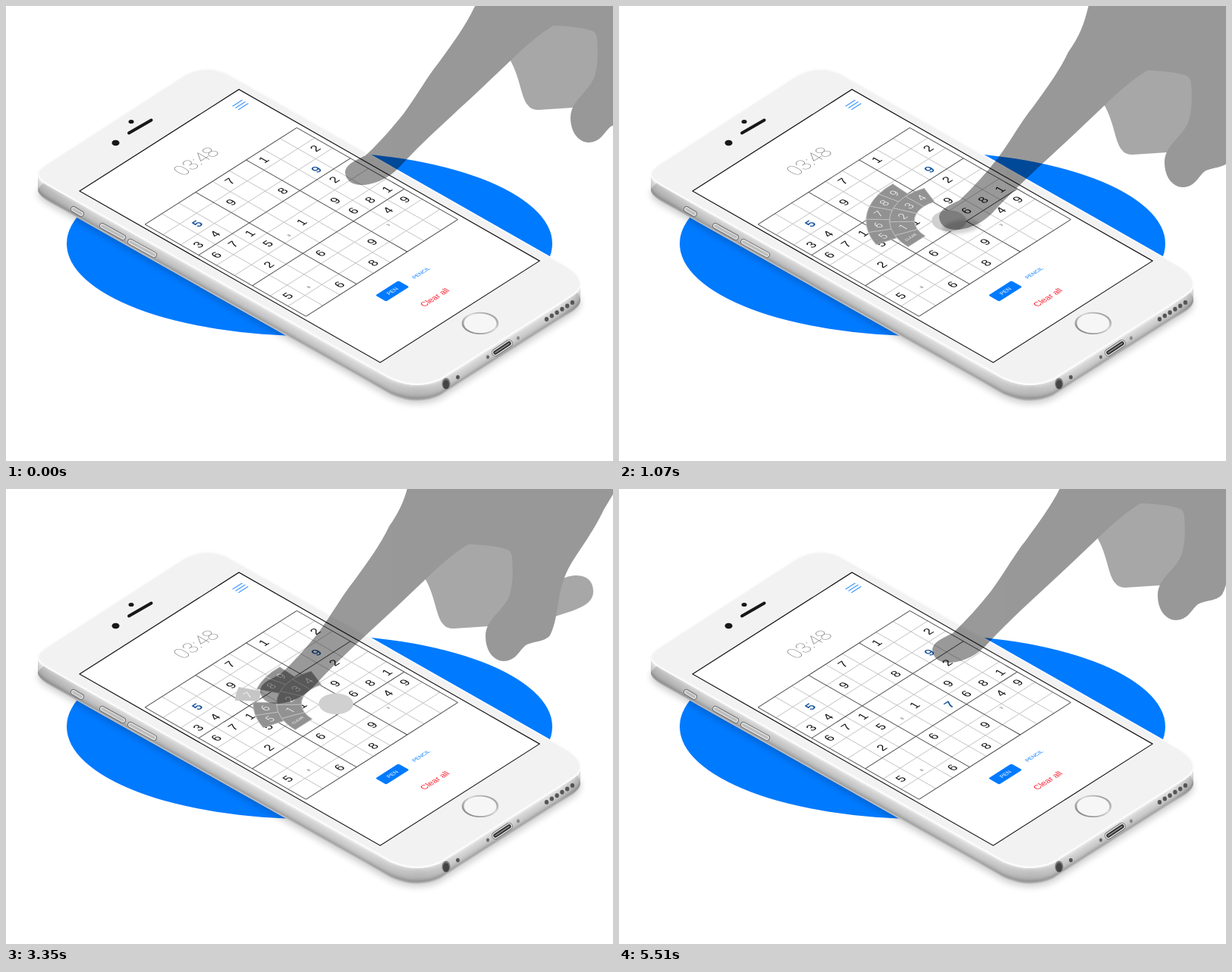
Animation, 800 px wide and 600 px high, one loop 6940 ms. Source, as an HTML page:

```html
<!DOCTYPE html>
<html lang="en">
<head>
<meta charset="utf-8">
<title>Sudoku radial input</title>
<style>
html, body { margin: 0; width: 100%; height: 100%; overflow: hidden; background: #fff; }
svg { display: block; width: 800px; height: 600px; }
text { font-family: "Liberation Sans", Arial, sans-serif; text-anchor: middle; }
.thin { font-family: Roboto, Inter, sans-serif; font-weight: 200; }
.light { font-family: Roboto, Inter, sans-serif; font-weight: 300; }
</style>
</head>
<body>
<svg viewBox="0 0 800 600" xmlns="http://www.w3.org/2000/svg">
  <defs>
    <path id="face" d="M59 205L234 92Q263 76 291 89L736 342Q757 354 757 367Q757 375 742 384L572 492Q541 506 506 490L58 237Q42 228 42 221Q43 215 59 205Z"/>
    <filter id="soft" x="-30%" y="-30%" width="160%" height="160%"><feGaussianBlur stdDeviation="5"/></filter>
    <filter id="blur" x="-50%" y="-100%" width="200%" height="300%"><feGaussianBlur stdDeviation="2"/></filter>
    <linearGradient id="shade" gradientUnits="userSpaceOnUse" x1="42" y1="0" x2="757" y2="0">
      <stop offset="0" stop-opacity=".14"/>
      <stop offset=".1" stop-opacity=".04"/>
      <stop offset=".6" stop-opacity="0"/>
      <stop offset=".7" stop-opacity=".1"/>
      <stop offset=".78" stop-opacity="0"/>
      <stop offset=".96" stop-opacity="0"/>
      <stop offset="1" stop-opacity=".14"/>
    </linearGradient>
    <linearGradient id="ring" x1="0" y1="0" x2="1" y2="0">
      <stop offset="0" stop-color="#8f8f8f"/>
      <stop offset=".6" stop-color="#d8d8d8"/>
      <stop offset="1" stop-color="#a4a4a4"/>
    </linearGradient>
  </defs>

  <ellipse cx="400" cy="313.500" rx="320" ry="121.500" fill="#007aff"/>
  <use href="#face" y="26" opacity=".2" filter="url(#soft)"/>
  <g id="side"></g>
  <use href="#face" y="22" fill="url(#shade)"/>

  <g id="buttons"></g>

  <use href="#face" y="1.500" fill="#fff"/>
  <use href="#face" fill="#f2f2f2" stroke="#fbfbfb" stroke-width="2"/>

  <g fill="#181818">
    <ellipse cx="144.500" cy="180.500" rx="5" ry="3.800"/>
    <ellipse cx="165" cy="152.500" rx="3.500" ry="2.600"/>
    <path d="M162 167.500L191.500 150.500" stroke="#181818" stroke-width="4" stroke-linecap="round"/>
  </g>

  <g id="ports"></g>

  <g transform="matrix(.56 -.3573 .594 .339 97 244)">
    <circle cx="187.500" cy="712" r="28" fill="#f6f6f6" stroke="url(#ring)" stroke-width="3.500"/>
    <rect width="375" height="667" fill="#fff" stroke="#111" stroke-width="1.900"/>
    <path d="M335 23.500h23m-23 6.500h23m-23 6.500h23" stroke="#1a84ff" stroke-width="1.700"/>
    <text class="thin" x="187.500" y="94.500" font-size="37" fill="#777">03:48</text>
    <g id="board"></g>
    <rect x="125.500" y="538" width="54" height="24" rx="3" fill="#007aff"/>
    <text x="152.500" y="554" font-size="11" fill="#fff">PEN</text>
    <text x="220" y="554" font-size="10.500" fill="#007aff">PENCIL</text>
    <text x="187.500" y="617" font-size="16.500" fill="#ff1f30">Clear all</text>
    <g id="wheel"></g>
  </g>

  <g id="hand">
    <ellipse id="contact" cx="476" cy="232" rx="25" ry="9" opacity="0" transform="rotate(-8 476 232)" filter="url(#blur)"/>
    <g opacity=".4">
      <path fill="#252525" d="M660 64C678 90 678 121 688 131Q692 137 702 137L748 134L790 110L785 30L720 20ZM840 74C862 61 886 66 886 88C886 106 865 112 836 121Z"/>
      <path d="M646 -70C640 -40 634 -22 617 2C606 26 588 50 570 75C556 92 543 116 524 142C508 162 492 180 474 197C460 204 447 209 447 220C448 231 458 237 472 236C490 234 505 226 517 214C552 176 590 143 625 110L665 72C684 53 702 38 721 26C735 26 760 28 773 33Q779 36 779 44C781 68 779 80 776 92C770 112 744 124 744 147C744 168 756 180 768 180C784 180 789 165 797 159C805 154 822 155 829 146C840 125 838 95 848 70C856 46 880 22 900 -20L930 -70Z"/>
    </g>
  </g>
</svg>
<script>
const $ = id => document.getElementById(id);
const clamp = x => Math.max(0, Math.min(1, x));
const label = (s, x, y, size, fill, extra = '') =>
  `<text x="${x}" y="${y + size * .36}" font-size="${size}" fill="${fill}" ${extra}>${s}</text>`;

// Metal side: the face repeated downwards, light near the glass, dark at the foot
const tones = [250, 236, 222, 214, 208, 204, 196, 182, 160, 205], depth = 22;
const toneAt = d => {
  const k = d / depth * (tones.length - 1), i = Math.min(Math.floor(k), tones.length - 2);
  return Math.round(tones[i] + (tones[i + 1] - tones[i]) * (k - i));
};
let side = '';
for (let d = depth; d > 0; d--) {
  const g = toneAt(d);
  side += `<use href="#face" y="${d}" fill="rgb(${g},${g},${g})"/>`;
}
$('side').innerHTML = side;

const pill = (x1, y1, x2, y2, layers) => layers.map(([color, width]) =>
  `<path d="M${x1} ${y1}L${x2} ${y2}" stroke="${color}" stroke-width="${width}" stroke-linecap="round"/>`).join('');
const keyLayers = [['#707070', 8], ['#e6e6e6', 6], ['#bdbdbd', 3.5]];
$('buttons').innerHTML =
  pill(89, 268, 99, 274, keyLayers) +
  pill(127, 290, 154, 305, keyLayers) +
  pill(164, 311, 195, 328, keyLayers);

const dot = (x, y, rx, ry, fill) => `<ellipse cx="${x}" cy="${y}" rx="${rx}" ry="${ry}" fill="${fill}"/>`;
let ports = pill(645, 457, 663, 445, [['#777', 10], ['#eee', 8], ['#333', 5.5], ['#999', 1.5]]);
for (let i = 0; i < 6; i++) ports += dot(712.5 + i * 6.8, 413 - i * 4.4, 2.7, 3, '#555');
ports += dot(635, 463, 2, 2.4, '#666') + dot(675, 438, 2, 2.4, '#888') +
  dot(595.5, 489.5, 2.4, 2.8, '#555') + dot(580, 498, 5.5, 7.5, '#777') + dot(580, 499, 4, 6, '#444');
$('ports').innerHTML = ports;

// Board
const cell = 39.7, left = 7.5, top0 = 138, span = cell * 9;
const rows = ['....7.1..', '.5.9....2', '34...8.9.', '671....2.', '..5.1.9..',
  '.2....681', '...6...49', '5....9...', '..6.8....'];
const entered = ['1,1', '2,7'];
const cx = c => left + (c + .5) * cell, cy = r => top0 + (r + .5) * cell;
const gridLine = (i, color, width) =>
  `<path d="M${left + i * cell} ${top0}v${span}M${left} ${top0 + i * cell}h${span}" stroke="${color}" stroke-width="${width}"/>`;
const penned = 'stroke="#0b4a96" stroke-width=".5"';
let board = '';
for (let i = 0; i <= 9; i++) if (i % 3) board += gridLine(i, '#c2c2c2', 1.3);
for (let i = 0; i <= 9; i += 3) board += gridLine(i, '#444', 1.5);
rows.forEach((row, r) => [...row].forEach((n, c) => {
  if (n === '.') return;
  const own = entered.includes(r + ',' + c);
  board += label(n, cx(c), cy(r), 23, own ? '#0b4a96' : '#111', own ? penned : '');
}));
board += label('8', cx(3), cy(4) + 10, 8, '#555') + label('3', cx(6) + 11, cy(7) - 12, 8, '#555') +
  label('8', cx(1), cy(7) + 9, 8, '#555');
board += label('7', cx(5), cy(5), 23, '#0b4a96', 'id="answer" ' + penned);
$('board').innerHTML = board;

// Radial keypad: two rings of five around the touched cell
const mid = 236;
const polar = (r, deg) => [r * Math.cos(deg * Math.PI / 180), r * Math.sin(deg * Math.PI / 180)];
const at = (r, deg) => polar(r, deg).map(v => v.toFixed(2)).join(' ');
const sector = (r1, r2, a, b) =>
  `M${at(r1, a)}L${at(r2, a)}A${r2} ${r2} 0 0 1 ${at(r2, b)}L${at(r1, b)}A${r1} ${r1} 0 0 0 ${at(r1, a)}Z`;
const ring = (keys, r1, r2, step) => keys.map((key, i) => {
  const a = mid + (i - 2.5) * step, [x, y] = polar((r1 + r2) / 2, a + step / 2);
  const word = key.length > 1;
  return `<g id="key${key}"><path d="${sector(r1, r2, a, a + step)}" fill="#929292" stroke="#c4c4c4" stroke-width="1"/>` +
    label(key, x, y, word ? 7.5 : 21, '#fff', word ? '' : 'class="light"') + '</g>';
}).join('');
$('wheel').innerHTML = '<circle r="28" fill="#d0d0d0"/>' +
  ring(['5', '6', '7', '8', '9'], 96, 134, 15.2) +
  ring(['CLEAR', '1', '2', '3', '4'], 56, 96, 22.4);
const seven = $('key7'), sevenShape = seven.querySelector('path');

// Hand moves: start, length, ease-out power, then from, control, to
const moves = [
  { start: 500, len: 510, pow: 1, pts: [[0, 0], [-13, 29], [-25, 59]] },
  { start: 2840, len: 510, pow: 2.7, pts: [[-25, 59], [-75, 69], [-112, 47]] },
  { start: 5060, len: 450, pow: 1.5, pts: [[-112, 47], [-88, -1], [-34, -7]] }
];
const loop = 6940, tick = 30;
// Progress through a span, advancing in ticks
const phase = (t, start, len) => clamp(Math.floor((t - start) / tick + 1e-6) * tick / len);
const bend = ([a, b, c], s) => [0, 1].map(i =>
  (1 - s) ** 2 * a[i] + 2 * s * (1 - s) * b[i] + s * s * c[i]);

function draw(t) {
  const m = moves.filter(v => t >= v.start).pop() || moves[0];
  const s = 1 - (1 - phase(t, m.start, m.len)) ** m.pow;
  const [x, y] = bend(m.pts, s);
  $('hand').setAttribute('transform', `translate(${x.toFixed(2)} ${y.toFixed(2)})`);

  const open = phase(t, 890, 180), shut = phase(t, 5060, 180);
  const size = open * (1 - shut);
  $('wheel').setAttribute('transform', `translate(227 355) scale(${size || .001})`);
  $('wheel').setAttribute('opacity', size);

  const pull = phase(t, 3140, 210);
  const [px, py] = polar(29 * pull, mid);
  seven.setAttribute('transform', `translate(${px.toFixed(2)} ${py.toFixed(2)})`);
  const g = Math.round(146 + 52 * pull);
  sevenShape.setAttribute('fill', `rgb(${g},${g},${g})`);

  $('contact').setAttribute('opacity', .17 * open * (1 - phase(t, 2870, 240)));
  $('answer').setAttribute('opacity', shut === 1 ? 1 : 0);
}

const begin = performance.now();
function frame(now) {
  draw(Math.max(0, now - begin) % loop);
  requestAnimationFrame(frame);
}
draw(0);
requestAnimationFrame(frame);
</script>
</body>
</html>
```
